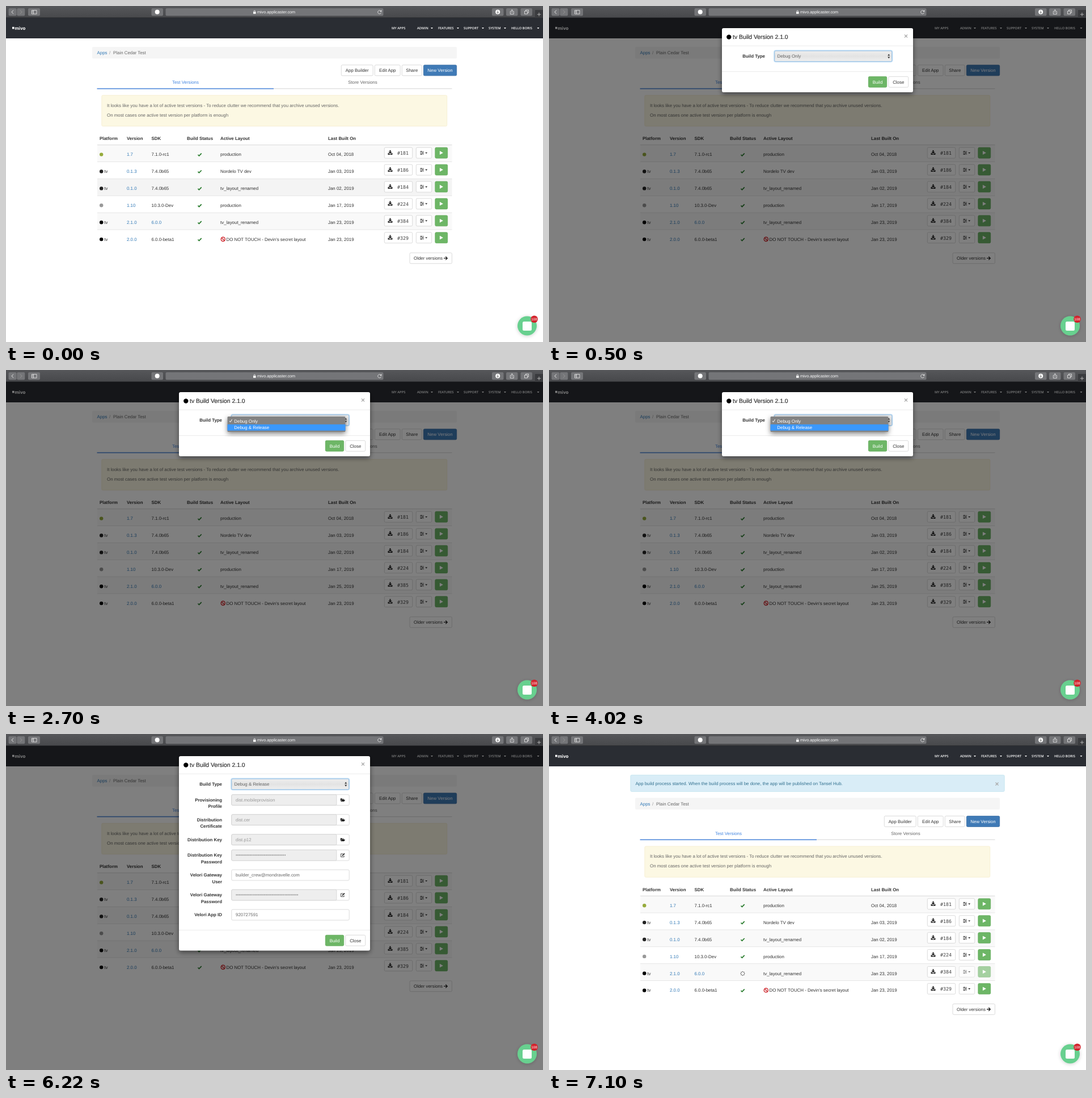
Recreate the animation shown at these times as an HTML page. Size 947x592 px, loop 8 s.

```html
<!DOCTYPE html>
<html lang="en">
<head>
<meta charset="utf-8">
<title>Build version</title>
<style>
html, body { margin: 0; width: 100%; height: 100%; overflow: hidden; background: #fff; }
svg { display: block; width: 947px; height: 592px; }
text { font: 7.9px "Liberation Sans", Arial, sans-serif; fill: #333; text-rendering: geometricPrecision; white-space: pre; }
.b { font-weight: 700; }
.m { text-anchor: middle; }
.e { text-anchor: end; }
.w { fill: #fff; }
.link { fill: #337ab7; }
.soft { fill: #666; }
.off { fill: #999; }
.url { font-size: 7.2px; fill: #fff; }
.nav { font: 600 5.8px "Open Sans", sans-serif; fill: #fff; }
.brand { font: 700 8px Inter, sans-serif; fill: #fff; }
.mono { font: 8.3px "DejaVu Sans Mono", monospace; fill: #444; }
.title { font-size: 10.4px; stroke: #333; stroke-width: .2px; }
.x { font-size: 12px; font-weight: 700; fill: #aaa; }
.count { font-size: 6.3px; fill: #fff; }
</style>
</head>
<body>
<svg id="stage" viewBox="0 0 947 592" xmlns="http://www.w3.org/2000/svg"></svg>
<script>
const LOOP = 8000;
const STEPS = [
  { at: 0, hover: true },
  { at: 500, modal: "short", choice: "Debug Only" },
  { at: 2700, modal: "short", choice: "Debug Only", menu: true, fresh: true },
  { at: 4900, modal: "long", choice: "Debug & Release", fresh: true },
  { at: 7100, started: true }
];
const ROW = 29.9, GREEN = "#6db666", DARK = "#222";

const esc = s => s.replace(/&/g, "&amp;");
const rect = (x, y, w, h, fill, more = "") =>
  `<rect x="${x}" y="${y}" width="${w}" height="${h}" fill="${fill}" ${more}/>`;
const text = (x, y, s, cls = "") => `<text x="${x}" y="${y}" class="${cls}">${esc(s)}</text>`;
const dot = (x, y, r, fill) => `<circle cx="${x}" cy="${y}" r="${r}" fill="${fill}"/>`;
const line = (d, stroke, width = 1) =>
  `<path d="${d}" fill="none" stroke="${stroke}" stroke-width="${width}"/>`;
const shape = (d, fill) => `<path d="${d}" fill="${fill}"/>`;
const group = (x, y, body, more = "") => `<g transform="translate(${x} ${y})" ${more}>${body}</g>`;
const caret = (x, y, fill) => shape(`M${x - 2} ${y - 1}h4l-2 2.2z`, fill);

function box(x, y, w, h, fill = "#fff", stroke = "#ccc") {
  return rect(x + .3, y + .3, w - .6, h - .6, fill, `rx="2" stroke="${stroke}" stroke-width=".7"`);
}
function button(x, y, w, label, fill, stroke) {
  return box(x, y, w, 19.5, fill, stroke) + text(x + w / 2, y + 12.6, label, fill ? "m w" : "m");
}

const icon = {
  check: line("M-3 .2L-1 2.2L3.2-2.2", "#287b2c", 1.7),
  download: shape("M-1-4.2h2v3h2.2L0 2L-3.2-1.2h2.2z", DARK) + shape("M-4 1h1.6L0 3.2L2.4 1H4v2.8h-8z", DARK),
  sliders: line("M-3.4-2.4h6.8M-3.4 0h6.8M-3.4 2.4h6.8", DARK, .7) +
    line("M-1.2-3.3v1.8M1.5-.9v1.8M-1.2 1.5v1.8", DARK, 1.4),
  play: shape("M-2.6-3.4L3.4 0L-2.6 3.4z", "#fff"),
  ban: dot(0, 0, 3.7, "#f3dede") + `<circle r="3.7" fill="none" stroke="#d0242b" stroke-width="1.2"/>` +
    line("M-2.6-2.6L2.6 2.6", "#d0242b", 1.2),
  arrow: line("M-3.2 0H2.6M0-2.9L2.9 0L0 2.9", DARK, 1.4),
  folder: shape("M-4 2.4v-5h2.6l.8.9h3v1.2h-4.4z", DARK) + shape("M-3.5 2.8L-1.7-.1h6L2.6 2.8z", DARK),
  edit: line("M1-2.6h-4.2v5.6h5.6V.8", DARK, .8) + line("M-1 1L3.3-3", DARK, 1.5),
  spinner: Array.from({ length: 8 }, (_, i) => {
    const a = i * Math.PI / 4;
    return dot((3.2 * Math.cos(a)).toFixed(2), (3.2 * Math.sin(a)).toFixed(2), .75, DARK);
  }).join("")
};

function chrome() {
  const key = (x, w) => rect(x, 4, w, 13.2, "#747578", 'rx="2"');
  const ink = "#eee";
  return rect(0, 0, 947, 21, "url(#bar)") + rect(0, 20.4, 947, .6, "#1d1f22") +
    key(4.5, 14) + key(19.3, 14) + key(39, 21) + key(256.5, 20.5) +
    key(281.5, 384) + key(857, 20.5) + key(882, 20.5) + key(907.5, 20.5) +
    line("M13 7.5L10 10.6L13 13.7", ink) + line("M25 7.5L28 10.6L25 13.7", "#999") +
    line("M45.5 7.5h8.5v6.5h-8.5zM48.5 7.5v6.5M46.4 9.3h1.2M46.4 11h1.2", ink, .8) +
    dot(266.7, 10.6, 4, "#fff") +
    rect(436, 10.2, 4.6, 3.6, "#fff", 'rx=".5"') + line("M437 10.4v-1a1.3 1.3 0 0 1 2.6 0v1", "#fff", .8) +
    text(443, 13.4, "mivo.applicaster.com", "url") +
    line("M661.3 9.3A3 3 0 1 0 661.6 11.5", ink, .8) + shape("M662.3 7v3.1h-3z", ink) +
    dot(867.2, 10.6, 4, "#fff") + line("M867.2 8.2v4.4M865.4 10.9l1.8 1.9l1.8-1.9", "#666", .9) +
    line("M890.6 9.3h-1.3v5h6v-5H894M892.3 12V6.6M890.6 8.2l1.7-1.7l1.7 1.7", ink, .8) +
    line("M914.5 9h5v5h-5zM916.5 9V7h5v5h-2", ink, .8) +
    rect(933, 7, 14, 14, "#3a3b3e") + line("M936.8 14.8h6.4M940 11.6v6.4", "#ccc", .8);
}

function navbar() {
  const items = [["MY APPS", 680], ["ADMIN", 725, 751], ["FEATURES", 762, 797],
    ["SUPPORT", 807, 841], ["SYSTEM", 851, 880], ["HELLO BORIS", 891, 938.5]];
  return rect(0, 21, 947, 36, "#2a2d33") + rect(11, 36.8, 3.6, 3.6, "#fff") + text(15.5, 42.4, "mivo", "brand") +
    items.map(([s, x, c]) => text(x, 41.1, s, "nav") + (c ? caret(c, 39, "#fff") : "")).join("");
}

const rows = [
  ["#96ab3c", "", "1.7", "7.1.0-rc1", "production", "Oct 04, 2018", "#181"],
  [DARK, "tv", "0.1.3", "7.4.0b65", "Nordelo TV dev", "Jan 03, 2019", "#186"],
  [DARK, "tv", "0.1.0", "7.4.0b65", "tv_layout_renamed", "Jan 02, 2019", "#184"],
  ["#999", "", "1.10", "10.3.0-Dev", "production", "Jan 17, 2019", "#224"],
  ["#000", "tv", "2.1.0", "6.0.0", "tv_layout_renamed", "Jan 23, 2019", "#384"],
  ["#000", "tv", "2.0.0", "6.0.0-beta1", "DO NOT TOUCH - Devin's secret layout", "Jan 23, 2019", "#329"]
];

function tableRow([tint, tv, version, sdk, layout, date, build], i, s) {
  const target = i === 4, last = i === 5, busy = target && s.started;
  if (target && s.fresh) { date = "Jan 25, 2019"; build = "#385"; }
  const fill = s.hover && i === 2 ? "#f4f4f4" : i % 2 ? "#fff" : "#f9f9f9";
  const tools = box(723, 4.4, 28, 19.5) + group(733.5, 14.2, icon.sliders) + caret(741.2, 14.3, DARK) +
    box(756.5, 4.4, 22.5, 19.5, GREEN, "#5fa858") + group(767.5, 14.1, icon.play);
  return group(0, 244.6 + i * ROW,
    rect(161, 0, 625.5, ROW, fill) + rect(161, -.4, 625.5, i ? .7 : 1.1, "#ddd") +
    dot(168.2, 17, 3.2, tint) + text(173.2, 19.8, tv) +
    text(213, 19.8, version, "link") + text(256.5, 19.8, sdk, target ? "link" : "") +
    group(341.5, 17.2, busy ? icon.spinner : icon.check) +
    (last ? group(382.8, 16.8, icon.ban) : "") + text(last ? 388.5 : 378, 19.8, layout) +
    text(568, 19.8, date) +
    box(667, 4.4, 50, 19.5) + group(677.5, 13.7, icon.download) + text(690, 17.6, build, "mono") +
    `<g opacity="${busy ? .6 : 1}">${tools}</g>`);
}

function content(s) {
  const heads = [["Platform", 165], ["Version", 213], ["SDK", 256.5], ["Build Status", 319],
    ["Active Layout", 378], ["Last Built On", 568]];
  return rect(152, 72, 643, 20.5, "#f5f5f5", 'rx="2"') +
    text(160.5, 85.3, "Apps", "link") + text(182, 85.3, "/", "off") + text(189, 85.3, "Plain Cedar Test", "soft") +
    button(591, 103.6, 56.5, "App Builder") + button(650, 103.6, 45.5, "Edit App") +
    button(698, 103.6, 35.5, "Share") + button(736, 103.6, 59, "New Version", "#3f7ab6", "#35699f") +
    `<text x="316.5" y="137" class="m" style="fill:#4285e0">Test Versions</text>` +
    text(629, 137, "Store Versions", "m soft") +
    rect(472, 145, 314.5, 1.2, "#ddd") + rect(160.5, 144.8, 311.5, 1.7, "#5a8fdc") +
    box(168.5, 157, 609.5, 55, "#fcf8e3", "#f5ebcb") +
    text(178, 177.6, "It looks like you have a lot of active test versions - To reduce clutter we recommend that you archive unused versions.", "soft") +
    text(178, 194.6, "On most cases one active test version per platform is enough", "soft") +
    heads.map(([h, x]) => text(x, 236.3, h, "b")).join("") +
    rows.map((r, i) => tableRow(r, i, s)).join("") +
    box(711.7, 434.6, 75, 19.5) + text(719, 447.2, "Older versions") + group(775.3, 444.4, icon.arrow);
}

function notice() {
  return box(143.5, 72, 660, 29.7, "#d9edf7", "#bce3ee") +
    `<text x="152.5" y="89.6" style="fill:#31708f">App build process started. When the build process will be done, the app will be published on Tansel Hub.</text>` +
    text(790, 92, "×", "m x");
}

// label lines, centre, value, trailing icon
const fields = [
  [["Provisioning", "Profile"], 116.2, "dist.mobileprovision", "folder"],
  [["Distribution", "Certificate"], 151.2, "dist.cer", "folder"],
  [["Distribution Key"], 186.2, "dist.p12", "folder"],
  [["Distribution Key", "Password"], 213.6, "•".repeat(32), "edit"],
  [["Velori Gateway", "User"], 248.6, "builder_crew@mondravelle.com"],
  [["Velori Gateway", "Password"], 283.6, "•".repeat(40), "edit"],
  [["Velori App ID"], 318.6, "920727591"]
];

function field([label, y, value, tail]) {
  return label.map((s, i) => text(381, y + 2.8 + i * 11.2, s, "b e")).join("") +
    box(397.5, y - 9.7, 208, 19.4) +
    (tail ? box(397.5, y - 9.7, 185.8, 19.4, "#eee") + group(593.8, y, icon[tail]) : "") +
    text(405, y + 2.8, value, tail ? "off" : "soft");
}

function modal(s) {
  const long = s.modal === "long", h = long ? 342.5 : 113, foot = long ? 230 : 0;
  return rect(305, 39, 337, h, "#fff", 'rx="3" filter="url(#shade)"') +
    dot(317.3, 54.6, 4.2, "#000") + text(324, 58.2, "tv Build Version 2.1.0", "title") +
    text(629.5, 57.3, "×", "m x") +
    rect(305, 69.8, 337, .7, "#e2e2e2") + rect(305, 115 + foot, 337, .7, "#e2e2e2") +
    text(381, 91.3, "Build Type", "b e") +
    rect(397.5, 78.8, 207.5, 19.2, "none", 'rx="2.5" stroke="#66afe9" stroke-opacity=".4" stroke-width="2.6"') +
    box(397.5, 78.8, 207.5, 19.2, "url(#select)", "#7fb0dc") +
    text(402.5, 91.3, s.choice, "soft") + shape("M597.2 87.5h4l-2-3zM597.2 89.5h4l-2 3z", "#333") +
    (long ? fields.map(field).join("") : "") +
    button(563, 124 + foot, 33, "Build", GREEN, "#5fa858") + button(598.5, 124 + foot, 35.5, "Close") +
    (s.menu ? menu() : "");
}

function menu() {
  return rect(390.5, 82, 208, 27, "#828282", 'rx="1.5" filter="url(#shade)"') +
    rect(390.5, 95.8, 208, 11, "#3b98fc") + line("M394 89.7l1.6 2.2l3-5", "#fff", 1) +
    text(402.3, 92.5, "Debug Only", "w") + text(402.3, 103.8, "Debug & Release", "w");
}

function chat() {
  return `<circle cx="919" cy="563.5" r="17" fill="#68d08f" filter="url(#soft)"/>` +
    rect(911, 556, 16, 16, "#fff", 'rx="2.5"') +
    dot(931.6, 551.8, 6.3, "#d3222b") + text(931.6, 554.1, "108", "m count");
}

const defs = `<defs>
  <linearGradient id="bar" x2="0" y2="1"><stop stop-color="#56575a"/><stop offset="1" stop-color="#47484b"/></linearGradient>
  <linearGradient id="select" x2="0" y2="1"><stop stop-color="#eee"/><stop offset=".5" stop-color="#e3e3e3"/><stop offset="1" stop-color="#efefef"/></linearGradient>
  <filter id="shade" x="-10%" y="-20%" width="120%" height="150%"><feDropShadow dx="0" dy="3" stdDeviation="4" flood-opacity=".5"/></filter>
  <filter id="soft" x="-40%" y="-40%" width="180%" height="180%"><feDropShadow dx="0" dy="1" stdDeviation="3" flood-opacity=".2"/></filter>
</defs>`;

function scene(s) {
  return defs + rect(0, 0, 947, 592, "#fff") + navbar() +
    (s.started ? notice() : "") + group(0, s.started ? 40.6 : 0, content(s)) +
    (s.modal ? rect(0, 21, 947, 571, "#000", 'opacity=".5"') + modal(s) : "") +
    chrome() + chat();
}

const stage = document.getElementById("stage");
let shown;
function tick() {
  const t = performance.now() % LOOP;
  const step = STEPS.filter(s => s.at <= t).pop();
  if (step !== shown) {
    stage.innerHTML = scene(step);
    shown = step;
  }
  requestAnimationFrame(tick);
}
tick();
</script>
</body>
</html>
```
